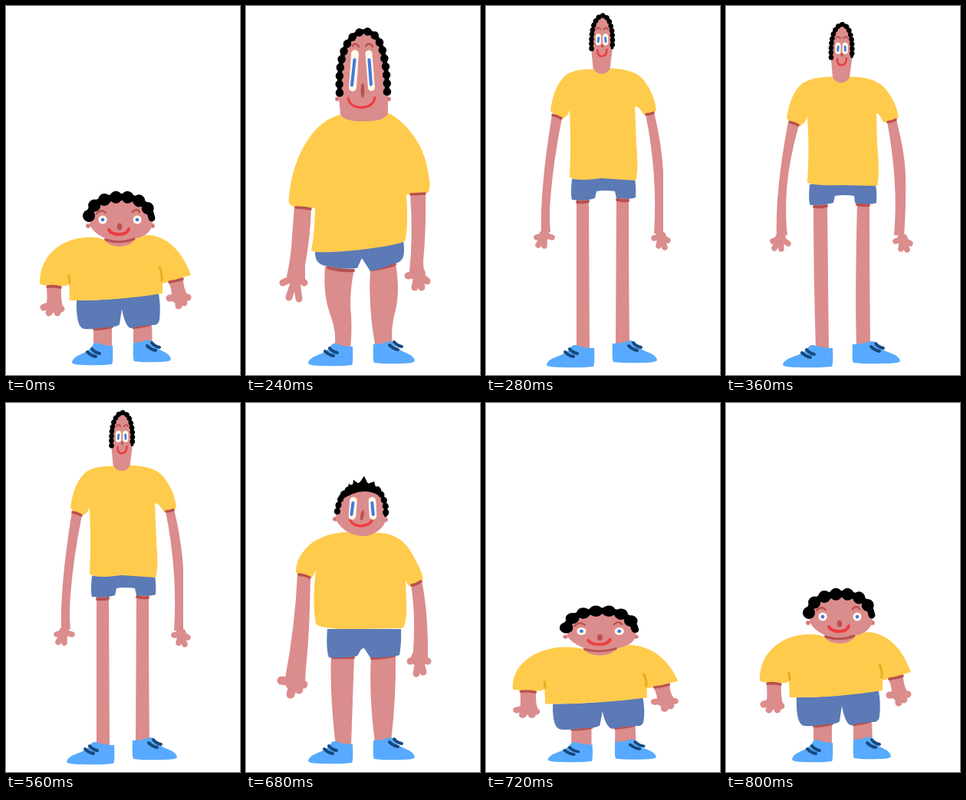
Write an HTML page that moves like this. It is 305 by 480 pixels and loops after 920 ms.

```html
<!DOCTYPE html>
<html lang="en">
<head>
<meta charset="utf-8">
<title>Stretchy kid</title>
<style>
html, body { margin: 0; width: 100%; height: 100%; overflow: hidden; background: #fff; }
svg { display: block; width: 100vw; height: 100vh; }
</style>
</head>
<body>
<svg id="stage" viewBox="0 0 305 480"></svg>
<script>
const SKIN = '#db8c8c', SHIRT = '#ffcb4c', SHORTS = '#5b7ab6', SHOE = '#57aaff',
  RUST = '#b9514e', LACE = '#17497d', LIPS = '#ee3b3f', IRIS = '#3f7be0',
  WHITE = '#fff7ec', FOLD = '#e9ad1f', HAIR = '#000';

const fill = (d, c) => `<path d="${d}" fill="${c}"/>`;
const line = (d, c, w, extra = '') =>
  `<path d="${d}" fill="none" stroke="${c}" stroke-width="${w}" stroke-linecap="round" stroke-linejoin="round" ${extra}/>`;
const oval = (x, y, rx, ry, c, turn = 0) =>
  `<ellipse cx="${x}" cy="${y}" rx="${rx}" ry="${ry}" fill="${c}" transform="rotate(${turn} ${x} ${y})"/>`;

// A palm with fingers fanning out to the given tips
const hand = ([x, y, r, w, ...tips]) =>
  oval(x, y, r, r, SKIN) + line(tips.map(t => `M${x} ${y}L${t}`).join(''), SKIN, w);

// dir is -1 for a toe pointing left, 1 for right
const shoe = (x, y, len, dir) =>
  `<g transform="translate(${x} ${y}) scale(${dir * len / 60} 1)">` +
  fill('M0 3Q12 3 20 0Q27-3 30 3Q35 10 47 14Q60 19 60 25Q58 28 42 28Q16 29 1 27Q-1 24 0 3Z', SHOE) + '</g>';
const laces = (x, y) => line(`M${x} ${y}q4 5 10 6m-16-2q5 5 11 6`, LACE, 4);

// Round curls strung along a path
const curls = (d, w, gap) => line(d, HAIR, w * .55) + line(d, HAIR, w, `stroke-dasharray="0.1 ${gap}"`);

const eye = ([white, w, iris, v]) => line(white, WHITE, w) + line(iris, IRIS, v);

const head = h =>
  (h.neck ? fill(h.neck, SKIN) : '') +
  h.ears.map(([x, y]) => oval(x, y, 3, 3, SKIN) + oval(x, y, 1, 1, RUST)).join('') +
  fill(h.face, SKIN) + (h.chin ? line(h.chin, RUST, 3) : '') +
  curls(...h.hair) + (h.spikes ? fill(h.spikes, HAIR) : '') +
  h.eyes.map(eye).join('') + (h.brows ? line(h.brows, RUST, h.brow) : '') +
  oval(...h.nose) + line(h.mouth, LIPS, h.lip);

const figure = p =>
  p.legs.map(d => fill(d, SKIN)).join('') +
  line(p.hems, RUST, 4) +
  shoe(...p.shoes[0], -1) + shoe(...p.shoes[1], 1) +
  laces(...p.laces[0]) + laces(...p.laces[1]) +
  fill(p.shorts, SHORTS) +
  p.arms.map(d => fill(d, SKIN)).join('') + p.hands.map(hand).join('') +
  fill(p.shirt, SHIRT) + line(p.cuffs, RUST, 3.6) +
  (p.folds ? line(p.folds, FOLD, 3) : '') +
  `<g transform="translate(${p.shift || '0 0'})">${head(p.head)}</g>`;

const squat = {
  legs: ['M114 416H138L138 446H114Z', 'M166 412H190L191 443H166Z'],
  hems: 'M115 420Q128 420 138 417M166 418Q180 417 188 414',
  shoes: [[139, 439, 53], [166, 435, 49]],
  laces: [[112, 446], [190, 438]],
  shorts: 'M92 383Q140 383 199 374Q202 392 200 408Q199 416 190 415Q174 416 162 419Q155 416 151 394L148 414Q145 418 128 418Q115 421 102 420Q91 419 92 383Z',
  arms: ['M53 364H72Q71 380 74 391L53 391Q54 378 53 364Z', 'M212 360L231 355Q231 366 236 375L216 381Q217 370 212 360Z'],
  hands: [[62, 388, 9, 9, '49 392', '56 399', '67 399', '72 394'], [225, 379, 9, 9, '213 380', '225 390', '232 386', '237 379']],
  shirt: 'M104 301C78 302 44 320 44 360Q45 364 52 363L72 364Q80 365 82 361L83 383Q140 384 204 374L204 361L241 350C232 325 215 301 187 298Q177 297 168 304L128 304Q118 300 104 301Z',
  cuffs: 'M54 365Q62 364 71 366M213 359Q222 358 230 355',
  folds: 'M82 351L83 360M200 340Q204 348 203 357',
  head: {
    neck: 'M127 302L169 302Q163 313 148 313Q133 313 127 302Z',
    chin: 'M130 304Q148 310 167 303',
    ears: [[107, 286], [191, 286]],
    face: 'M109 285Q110 265 125 257Q150 246 172 257Q190 267 191 283Q190 292 181 298Q165 306 148 305Q121 305 109 285Z',
    hair: ['M108 273Q112 257 128 252Q144 247 160 249Q186 254 190 276', 16, 15.2],
    eyes: [['M126 278h.1', 11, 'M126 278h.1', 4.6], ['M171 278h.1', 11, 'M171 278h.1', 4.6]],
    brows: 'M118 270Q124 263 130 269M165 268Q170 262 174 268', brow: 2.4,
    nose: [148, 287, 3.2, 4.5, RUST],
    mouth: 'M134 291Q137 297 147 297Q158 297 160 290', lip: 4
  }
};

const rising = {
  legs: ['M103 339L141 343Q136 365 136 390Q139 420 136 446H115Q119 425 110 402Q100 375 103 339Z',
    'M162 341L195 335Q201 370 195 395Q188 420 191 440H168Q159 390 162 341Z'],
  hems: 'M107 340Q122 345 140 344M163 343Q180 341 194 336',
  shoes: [[139, 440, 58], [166, 437, 54]],
  laces: [[109, 445], [193, 437]],
  shorts: 'M90 320Q150 318 205 304Q207 318 205 326Q203 333 194 335Q176 342 162 345L151 328L145 341Q125 343 110 339Q89 338 90 320Z',
  arms: ['M63 261L85 263Q84 300 77 337L77 356L53 352Q59 325 60 300Z', 'M214 244L234 243Q235 290 231 332L232 348L213 346Q218 300 214 244Z'],
  hands: [[65, 352, 11, 9, '48 360', '56 379', '69 381', '76 360'], [224, 348, 10, 9, '211 351', '220 366', '229 366', '236 358']],
  shirt: 'M124 141C92 148 62 188 56 248Q54 260 63 261L90 263Q89 300 85 318Q92 323 150 317Q198 311 207 306Q212 290 209 245Q225 245 237 243Q242 238 237 215C233 180 207 150 187 140Z',
  cuffs: 'M65 262Q75 262 84 264M215 245L233 244',
  head: {
    ears: [[119, 121], [186, 121]],
    face: 'M121 118L121 90Q120 55 136 42Q155 26 174 46Q183 70 185 118L185 140Q181 150 155 150Q129 151 123 141Z',
    hair: ['M122 113Q120 70 132 49Q142 33 155 33Q171 33 178 58Q184 80 184 113', 10.5, 10.8],
    eyes: [['M142 62L139 106', 10, 'M141.5 70L138 103', 4], ['M160 62L163.5 106', 9, 'M160.5 70L163 102', 4]],
    brows: 'M139 52Q142 46 147 53M156 52Q161 46 165 53', brow: 2.6,
    nose: [152, 110, 2.5, 9.5, RUST],
    mouth: 'M133 120Q136 132 151 132Q166 131 168 119', lip: 3
  }
};

const slim = {
  ears: [],
  face: 'M137 70Q136 38 143 29Q151 18 160 29Q166 42 164 70L161 93Q157 100 150 100Q142 99 139 92Z',
  hair: ['M137 67Q136 38 144 29Q151 19 159 29Q166 42 164 66', 6.6, 6],
  eyes: [['M146 51V59', 7.2, 'M146.3 53L145.7 58', 2.8], ['M155.3 51V59', 7.2, 'M155.1 53L155.5 58', 2.8]],
  brows: 'M143 42Q146 38 149 42M153 42Q156 38 159 42', brow: 1.8,
  nose: [151, 63.5, 1.4, 2.4, RUST],
  mouth: 'M145 69Q145 77 150 77Q157 77 157 68', lip: 2.5
};

const tall = {
  legs: ['M114 258H132L134 447H117Q114 350 114 258Z', 'M171 255H187Q187 350 188 442H170Q168 380 171 255Z'],
  hems: 'M115 261Q124 262 131 260M171 258Q179 260 186 259',
  shoes: [[139, 442, 65], [165, 437, 62]],
  laces: [[105, 447], [195, 439]],
  shorts: 'M109 232Q150 229 194 232Q197 235 196 256Q190 259 168 256L167 247Q155 245 142 247L140 256Q130 259 110 259Q107 255 109 232Z',
  arms: ['M81 151L95 155Q82 200 79 240Q77 275 80 298L66 300Q64 240 81 151Z', 'M210 150L222 148Q233 190 234 220Q235 260 232 299L219 298Q225 230 210 150Z'],
  hands: [[71, 302, 7, 7.5, '61 306', '63 315', '72 316', '81 309'], [230, 303, 7, 7.5, '221 306', '228 316', '236 317', '240 309']],
  shirt: 'M138 92Q110 92 98 102Q84 114 79 146Q84 154 97 156Q104 152 106 143Q109 190 106 229Q108 234 150 233L197 234Q201 220 197 180L196 140Q199 138 205 151Q216 152 225 145Q222 125 208 108Q195 92 162 92Z',
  cuffs: 'M83 151Q89 152 94 155M211 151Q217 150 221 148',
  head: slim
};

const taller = {
  legs: ['M118 252H134L135 447H118Z', 'M170 250H186Q186 350 187 441H169Z'],
  hems: 'M119 255Q127 256 133 254M171 252Q179 254 185 253',
  shoes: [[141, 442, 62], [165, 436, 58]],
  laces: [[109, 446], [192, 438]],
  shorts: 'M112 225Q150 222 194 225Q196 235 195 249Q190 252 170 250L168 241Q155 239 144 241L142 250Q130 254 112 252Q110 246 112 225Z',
  arms: ['M86 141L99 146Q88 200 84 250Q82 275 84 294L72 296Q70 240 86 141Z', 'M208 141L219 138Q229 180 231 215L231 296H219Q224 220 208 141Z'],
  hands: [[76, 298, 7, 7.5, '66 301', '68 311', '76 312', '86 301'], [228, 300, 7, 7.5, '219 302', '225 312', '233 314', '237 305']],
  shirt: 'M139 82Q114 82 104 90Q88 104 84 136Q89 144 100 146Q107 144 109 135Q111 180 109 222Q113 229 150 224L195 227Q199 215 196 180L194 131Q198 128 206 142Q215 143 222 136Q220 115 206 97Q195 82 162 81Z',
  cuffs: 'M87 142Q93 143 98 146M209 141Q214 141 218 139',
  shift: '0.5 -11.5',
  head: slim
};

const falling = {
  legs: ['M111 329H141L137 446H117Q109 380 111 329Z', 'M163 329L195 327Q196 380 189 441H168Q160 380 163 329Z'],
  hems: 'M113 331H140M164 332Q180 332 194 328',
  shoes: [[139, 441, 58], [166, 436, 54]],
  laces: [[108, 446], [193, 437]],
  shorts: 'M106 294H202Q203 310 200 328Q180 332 162 331L154 319Q150 318 146 328Q142 332 108 331Q104 320 106 294Z',
  arms: ['M67 223L84 227Q83 300 78 345L77 364L51 358Q64 290 67 223Z', 'M215 236L229 231Q237 270 237 322L237 334L217 334Q222 280 215 236Z'],
  hands: [[63, 363, 12, 11, '46 361', '58 379', '69 373', '75 366'], [226, 332, 11, 9, '214 336', '222 352', '231 350', '237 336']],
  shirt: 'M127 168Q90 172 75 193Q65 205 65 220Q70 227 84 228Q88 226 91 217Q86 260 91 287Q96 295 150 294L203 293Q210 290 209 260L208 230Q211 239 216 239L231 229Q228 215 214 192Q200 170 174 169Z',
  cuffs: 'M69 223Q77 224 83 227M216 237Q223 236 228 232',
  head: {
    ears: [[116, 151], [182, 152]],
    face: 'M117 148Q118 120 135 112Q153 105 172 116Q184 130 183 150Q179 167 158 173Q131 175 117 152Z',
    hair: ['M119 141Q122 118 136 111Q155 103 171 112Q184 126 182 146', 8, 8],
    spikes: 'M121 121L128 113L131 116L134 105L139 108L140 100L147 105L154 95L159 105L167 102L169 110L176 112L178 124Q155 104 121 128Z',
    eyes: [['M140 127L138.5 147', 9.6, 'M139.5 130L137.5 145', 4], ['M164.5 127L165.5 147', 9.6, 'M164.3 130L165.8 145', 4]],
    nose: [151.5, 146, 2.2, 6.8, RUST, 10],
    mouth: 'M136 153Q140 160 150 160Q161 159 164 153', lip: 3.4
  }
};

const squash = `<g transform="translate(143 467) scale(1.095 .9) translate(-143 -467)">${figure(squat)}</g>`;
const high = figure(taller), low = figure(squat);
const LOOP = 920;
const beats = [[0, low], [240, figure(rising)], [280, high], [360, figure(tall)],
  [560, high], [680, figure(falling)], [720, squash], [800, low]];

const stage = document.getElementById('stage');
let shown;
function draw(time) {
  const t = time % LOOP;
  const art = beats.filter(([at]) => at <= t).pop()[1];
  if (art !== shown) stage.innerHTML = shown = art;
}

const start = performance.now();
function tick() {
  draw(performance.now() - start);
  requestAnimationFrame(tick);
}
tick();
</script>
</body>
</html>
```
